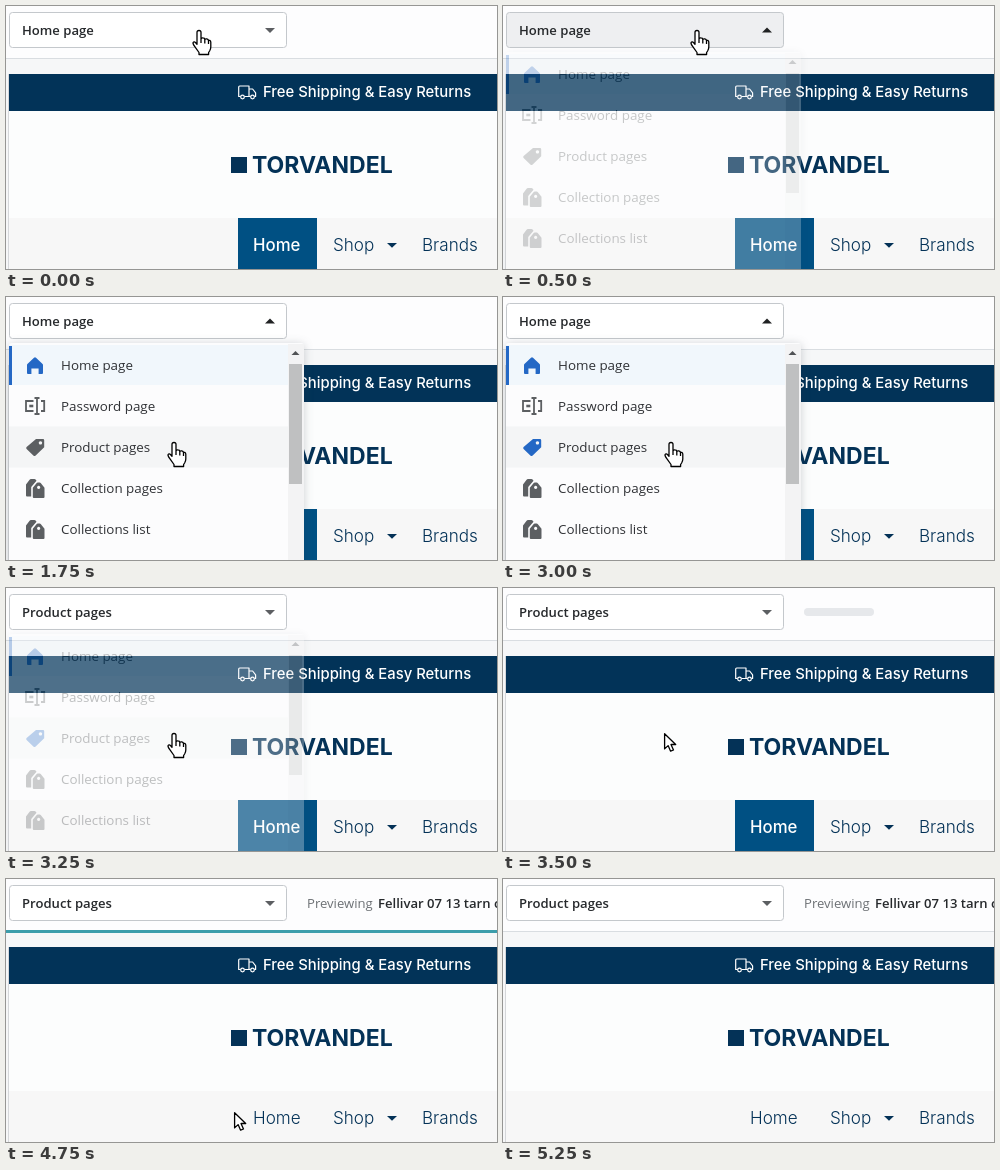
An HTML page that plays this animation: 491x263 px, repeating every 6.25 s.

```html
<!DOCTYPE html>
<html lang="en">
<head>
<meta charset="utf-8">
<title>Theme preview page picker</title>
<style>
  html, body { margin: 0; width: 100%; height: 100%; overflow: hidden; background: #fcfcfd; }
  svg { display: block; width: 491px; height: 263px; }
  .ui { font: 600 13.1px "Open Sans", "Noto Sans", sans-serif; fill: #26292c; }
  .item { font: 400 13.4px "Open Sans", "Noto Sans", sans-serif; fill: #303236; }
  .nav { font: 300 17.1px Inter, sans-serif; fill: #043257; }
  .nav .current { font-weight: 500; font-size: 16.8px; fill: #fff; }
  #menu { filter: drop-shadow(0 1px 5px rgba(40, 50, 60, .22)); }
</style>
</head>
<body>
<svg viewBox="0 0 491 263" xmlns="http://www.w3.org/2000/svg">
  <defs>
    <path id="house" d="M28 60.7q1-.9 2 0l6.6 6.2q.4.4.4 1V76q0 1-1 1h-3.4v-5.5h-7.2V77H22q-1 0-1-1v-8.1q0-.6.4-1z"/>
    <g id="field" fill="none" stroke="currentColor" stroke-width="1.8">
      <path d="M27.5 104H20v10h7.5M35 104h3.2v10H35M28.5 101h5M28.5 117h5M31 101v16"/>
      <path d="M23.3 109h4" stroke-width="2.6"/>
    </g>
    <path id="tag" fill-rule="evenodd" d="M30 142h7q1.2 0 1.2 1.2v7l-8.8 8.5q-.9.8-1.8 0l-7-6.8q-.9-.9 0-1.8zm4.4 2.2a1.7 1.7 0 1 0 .1 0z"/>
    <g id="tags">
      <path d="M20 198.5V187.5l3.6-4.8q.5-.7 1.4-.7h3.4q.9 0 1.4.7l.7 1-5.3 6.3v9.5H21q-1 0-1-1z"/>
      <path fill-rule="evenodd" d="M26.8 200v-9.2l3.7-4.6q.5-.7 1.3-.7h1.8q.8 0 1.3.7l3.6 4.6v9.2q0 1-1 1h-9.7q-1 0-1-1zm5.8-11.2a1.6 1.6 0 1 0 .1 0z"/>
    </g>
  </defs>

  <rect width="491" height="263" fill="#f6f7f8"/>
  <rect width="491" height="52" fill="#fdfdfe"/>
  <rect y="52" width="491" height="1" fill="#d9dde1"/>
  <rect id="bar" y="51" width="491" height="3" fill="#3c9dab"/>

  <rect x="2" y="68" width="1" height="195" fill="#d5d7da"/>
  <rect x="3" y="105" width="488" height="107" fill="#fcfdfd"/>
  <rect x="3" y="212" width="488" height="51" fill="#f7f7f7"/>
  <rect x="3" y="68" width="488" height="37" fill="#023358"/>
  <g fill="none" stroke="#fff" stroke-width="1.2" stroke-linejoin="round">
    <path d="M234.5 90.5h-1.8V81q0-1 1-1h9.3v10.5h-4.5M243 83h3.6l3 3.8v3.7h-1.2M244.6 90.5H243"/>
    <circle cx="236.5" cy="91" r="1.8"/><circle cx="246.5" cy="91" r="1.8"/>
  </g>
  <text x="257" y="91" style="font:500 14.85px Inter,sans-serif" fill="#fff">Free Shipping &amp; Easy Returns</text>

  <rect x="225" y="151" width="16" height="16" fill="#043257"/>
  <text x="246" y="167" style="font:700 23px Inter,sans-serif" fill="#043257">TORVANDEL</text>

  <rect id="homeBox" x="232" y="212" width="79" height="51" fill="#005083"/>
  <g class="nav">
    <text id="homeText" x="247" y="245">Home</text>
    <text x="327" y="245">Shop</text>
    <text x="416" y="245">Brands</text>
    <path d="M381 237h10l-5 4.8z"/>
  </g>

  <rect id="button" x="3.5" y="6.5" width="277" height="35" rx="3" stroke="#c4c8cc"/>
  <text id="choice" class="ui" x="16" y="29"></text>
  <path id="caret"/>
  <rect id="skeleton" x="301" y="20" width="70" height="8" rx="4" fill="#e6e8eb"/>
  <g id="preview" class="ui">
    <text x="301" y="29" style="font-weight:400" fill="#6d7175">Previewing</text>
    <text x="372" y="29">Fellivar 07 13 tarn crew</text>
  </g>

  <g id="menu">
    <rect x="3" y="46" width="295" height="225" rx="3" fill="#fcfcfd"/>
    <rect x="3" y="48" width="279" height="40" fill="#f1f7fc"/>
    <rect id="hover" x="3" width="279" height="41"/>
    <rect x="3" y="49" width="3" height="39" fill="#2468c5"/>
    <rect x="282" y="47" width="16" height="216" fill="#f3f3f4"/>
    <rect x="283" y="67" width="13" height="120" fill="#bfc0c1"/>
    <path d="M285.5 58h8l-4-4z" fill="#505255"/>
    <g id="items" class="item"></g>
    <use href="#house" fill="#2468c5"/>
    <use href="#field" color="#5c5f62"/>
    <use id="tagIcon" href="#tag"/>
    <use href="#tags" fill="#5c5f62"/>
    <use href="#tags" y="41" fill="#5c5f62"/>
  </g>

  <g fill="#fff" stroke="#000" stroke-width="1.3" stroke-linejoin="round">
    <path id="hand" d="M-2 1.4Q-2-.5 0-.5T2 1.4V8q.3-1.3 2-1.1 1.7.1 1.8 1.6.5-.9 2-.6 1.6.3 1.7 1.7.5-.5 1.3-.2 1 .4 1 1.9V16q0 2-1.2 4L9.6 21.5V23.5H0v-2l-4-5.7q-2.5-3-1.9-4.3.9-1.4 2.6.2L-2 13.2zM2 8v4M5.8 8.5v4M9.5 9.6v3.3"/>
    <path id="arrow" d="M.6.7v15.2l3.5-3.3 2.5 5.6 2.9-1.2-2.5-5.5h4.7z"/>
  </g>
</svg>

<script>
const $ = id => document.getElementById(id);
const LOOP = 6250;

$("items").innerHTML = ["Home page", "Password page", "Product pages", "Collection pages", "Collections list"]
  .map((name, i) => `<text x="55" y="${73 + 41 * i}">${name}</text>`).join("");

// Each step carries only what differs from the step before it.
const start = {
  choice: "Home page", open: false, pressed: false, menu: 0, hover: 0, picked: false,
  skeleton: 0, preview: 0, bar: 0, home: true, cursor: "hand", at: [193, 25]
};
const steps = [
  [0, {}],
  [250, { open: true, pressed: true, at: [194, 25] }],
  [500, { menu: .26 }],
  [750, { menu: .85 }],
  [1000, { menu: 1, pressed: false, hover: 1, at: [181, 104] }],
  [1250, { at: [180, 105] }],
  [1750, { hover: 2, at: [168, 146] }],
  [3000, { picked: true }],
  [3250, { choice: "Product pages", open: false, menu: .3 }],
  [3500, { menu: 0, skeleton: 1, cursor: "arrow", at: [161, 145] }],
  [4250, { skeleton: .6, home: false }],
  [4500, { skeleton: 0, preview: 1, at: [214, 237] }],
  [4750, { bar: 1, at: [228, 233] }],
  [5000, { bar: .5, at: [230, 249] }],
  [5250, { bar: 0, cursor: "" }]
];

function set(id, attrs) {
  for (const key in attrs) $(id).setAttribute(key, attrs[key]);
}

function stateAt(time) {
  return Object.assign({}, start, ...steps.filter(([from]) => from <= time).map(([, change]) => change));
}

function draw(time) {
  const s = stateAt(time);
  for (const id of ["menu", "skeleton", "preview", "bar"]) set(id, { opacity: s[id] });

  set("button", { fill: s.pressed ? "#eeeff1" : "#fff" });
  $("choice").textContent = s.choice;
  set("caret", {
    d: s.open ? "M259 26.5h10l-5-5z" : "M259 22h10l-5 5z",
    fill: s.open ? "#202223" : "#5c5f62"
  });

  set("hover", {
    y: 47.5 + 41 * s.hover,
    fill: s.hover === 1 ? "#f8f8f9" : "#f4f5f6",
    opacity: s.hover ? 1 : 0
  });
  set("tagIcon", { fill: s.picked ? "#2468c5" : "#5c5f62" });

  set("homeBox", { opacity: s.home ? 1 : 0 });
  set("homeText", { class: s.home ? "current" : "" });

  for (const id of ["hand", "arrow"]) {
    set(id, { opacity: s.cursor === id ? 1 : 0, transform: `translate(${s.at})` });
  }
}

const begin = performance.now();
function tick() {
  draw((performance.now() - begin) % LOOP);
  requestAnimationFrame(tick);
}
tick();
</script>
</body>
</html>
```
